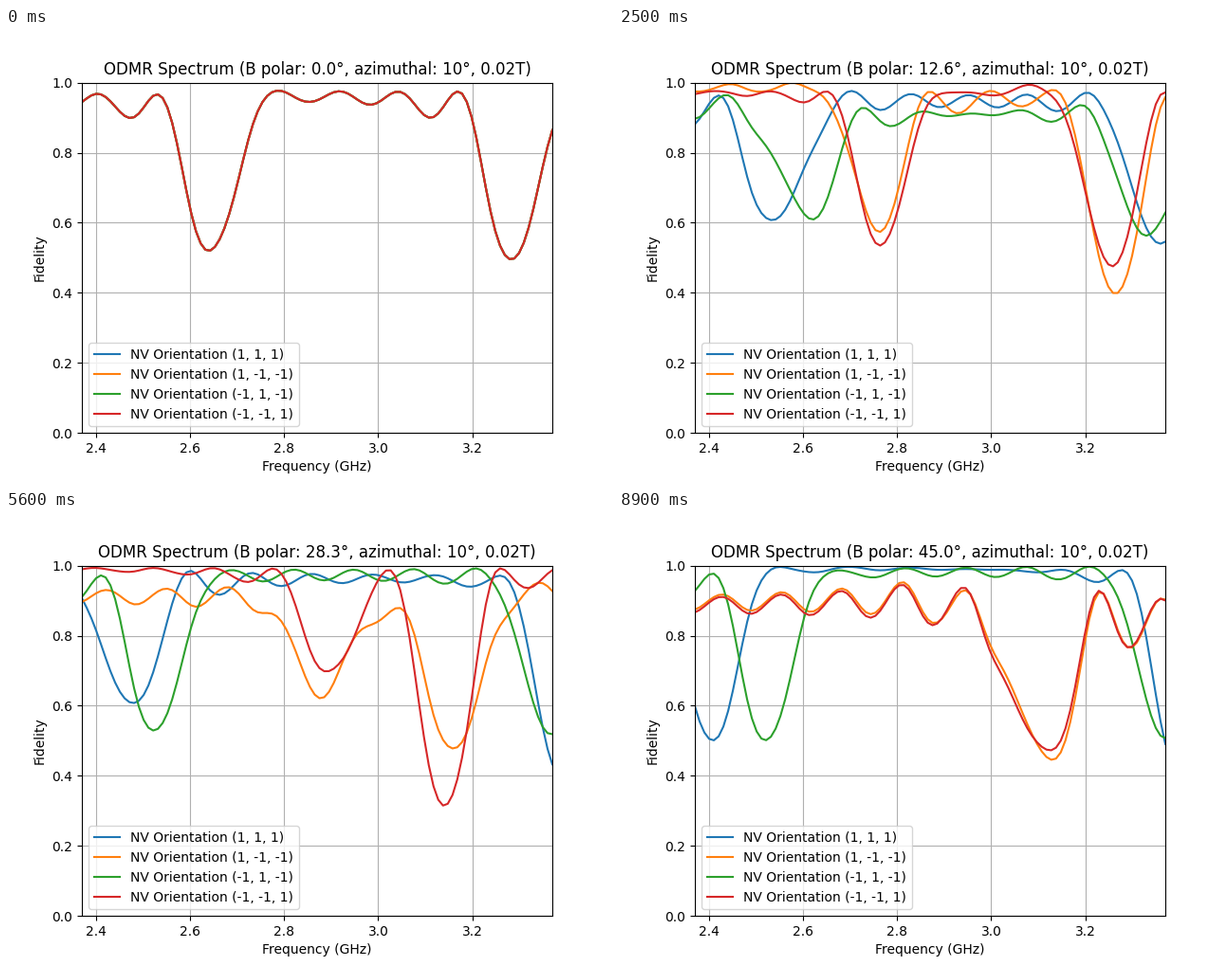
A matplotlib script that plays this animation: 640x480 px, repeating every 9 s.

```python
import numpy as np
import matplotlib.pyplot as plt
from matplotlib.animation import FuncAnimation

FRAMES = 90
D = 2.87            # zero-field splitting, GHz
GAMMA = 28.025      # GHz / T
B0 = 0.02           # T
AZIMUTH = 10        # degrees
DRIVE = 0.0495      # microwave amplitude, GHz
PULSE = 7.957       # ns
STEPS = 400
AXES = [(1, 1, 1), (1, -1, -1), (-1, 1, -1), (-1, -1, 1)]

freqs = np.linspace(2.37, 3.37, 100)
polars = np.linspace(0, 45, FRAMES)
normals = np.array(AXES) / np.sqrt(3)

# Spin-1 operators in the basis where the drive operator Sx is diagonal
m = np.array([1.0, 0.0, -1.0])
Sx = np.diag(m)
Sz = np.array([[0, 1, 0], [1, 0, 1], [0, 1, 0]]) / np.sqrt(2)
zero = np.array([1, 0, -1]) / np.sqrt(2)

dt = PULSE / STEPS
mid = (np.arange(STEPS) + 0.5) * dt
wave = -DRIVE * np.sin(2 * np.pi * mid[:, None] * freqs)
kicks = np.exp(-2j * np.pi * dt * m[None, :, None] * wave[:, None, :])


def propagators(H, t):
    E, V = np.linalg.eigh(H)
    phase = np.exp(-2j * np.pi * E * t)
    return (V * phase[:, None, :]) @ V.transpose(0, 2, 1)


def spectra(polar):
    """Survival probability of |0> after the pulse, one row per axis."""
    th, ph = np.radians([polar, AZIMUTH])
    b = np.array([np.sin(th) * np.cos(ph), np.sin(th) * np.sin(ph), np.cos(th)])
    c = (normals @ b)[:, None, None]
    s = np.sqrt(1 - c**2)
    H = D * Sz @ Sz + GAMMA * B0 * (c * Sz + s * Sx)
    full, half = propagators(H, dt), propagators(H, dt / 2)

    psi = np.ones((len(AXES), 3, len(freqs))) * zero[:, None]
    psi = half @ psi
    for kick in kicks[:-1]:
        psi = full @ (psi * kick)
    psi = half @ (psi * kicks[-1])
    return np.abs(np.einsum("k,akf->af", zero, psi)) ** 2


fig, ax = plt.subplots(figsize=(6.4, 4.8), dpi=100)
lines = [ax.plot([], [], label=f"NV Orientation {a}")[0] for a in AXES]
ax.set_xlim(freqs[0], freqs[-1])
ax.set_ylim(0, 1)
ax.set_xlabel("Frequency (GHz)")
ax.set_ylabel("Fidelity")
ax.grid(True)
ax.legend(loc="lower left")
title = ax.set_title("")


def update(i):
    for line, y in zip(lines, spectra(polars[i])):
        line.set_data(freqs, y)
    title.set_text(
        f"ODMR Spectrum (B polar: {polars[i]:.1f}°, azimuthal: {AZIMUTH}°, {B0}T)"
    )
    return [*lines, title]


anim = FuncAnimation(fig, update, frames=FRAMES, interval=100, repeat=True)
plt.show()
```
